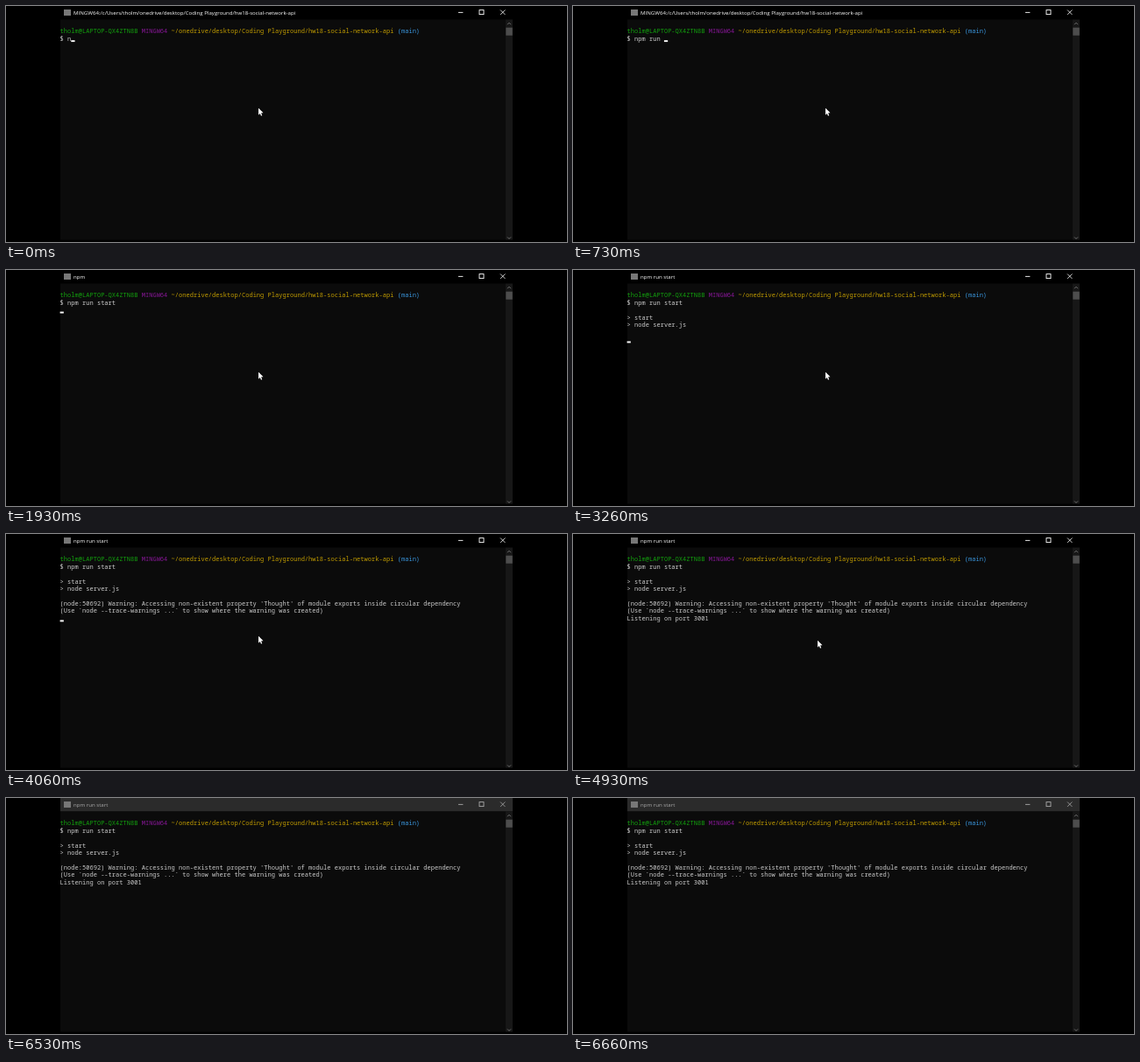
Recreate the animation shown at these times as an HTML page with a canvas. Size 640 by 270 pixels, loop 6730 ms.

```html
<!DOCTYPE html>
<html lang="en">
<head>
<meta charset="utf-8">
<title>Terminal</title>
<style>
html, body { margin: 0; width: 100%; height: 100%; overflow: hidden; background: #000; }
canvas { display: block; width: 640px; height: 270px; }
</style>
</head>
<body>
<canvas id="stage" width="640" height="270"></canvas>
<script>
const ctx = document.getElementById('stage').getContext('2d');
const LOOP = 6730, STEP = LOOP / 101, BLINK = 530;
const LEFT = 61.6, CELL = 4.232, BASE = 31.1, ROW = 8.47;
const MONO = '"Noto Sans Mono", "DejaVu Sans Mono", monospace';
const SANS = '"Open Sans", sans-serif';
const GREY = '#cccccc';

const USER = 'tholm';
const PROJECT = 'onedrive/desktop/Coding Playground/hw18-social-network-api';
const PROMPT = [
  [USER + '@LAPTOP-QX4ZTN8B ', '#13a10e'],
  ['MINGW64 ', '#881798'],
  ['~/' + PROJECT + ' ', '#c19c00'],
  ['(main)', '#3a96dd']
];
const COMMAND = 'npm run start';
const KEYS = [0, 130, 260, 330, 460, 530, 600, 730, 860, 930, 1000, 1130, 1200];
const ENTER = 1430, BLUR = 6400;

const TITLES = [
  [0, 'MINGW64:/c/Users/' + USER + '/' + PROJECT],
  [1660, 'npm'],
  [2530, 'npm run start']
];
// time, first row, lines
const OUTPUT = [
  [3130, 3, ['> start', '> node server.js']],
  [4060, 6, [
    "(node:50692) Warning: Accessing non-existent property 'Thought' of module exports inside circular dependency",
    '(Use `node --trace-warnings ...` to show where the warning was created)'
  ]],
  [4200, 8, ['Listening on port 3001']]
];
// time, column, row of the text cursor after Enter
const CARET = [[ENTER, 0, 2], [3130, 0, 6], [4060, 0, 8], [4200, 0, 9]];
// time, x, y of the pointer tip
const POINTER = [
  [0, 288, 116.7], [4400, 288, 116.7], [4700, 279, 121.7], [4930, 279, 121.7],
  [5400, 338, 260], [5800, 361.3, 225], [5900, 361.3, 225], [6190, 372, 276]
];

const latest = (list, t) => list.filter(item => item[0] <= t).pop();

function rect(x, y, w, h, color) {
  ctx.fillStyle = color;
  ctx.fillRect(x, y, w, h);
}

// Large type scaled down keeps fractional advances.
function text(str, x, y, size, family, color) {
  ctx.save();
  ctx.translate(x, y);
  ctx.scale(0.1, 0.1);
  ctx.font = size * 10 + 'px ' + family;
  ctx.fillStyle = color;
  ctx.fillText(str, 0, 0);
  ctx.restore();
}

function cells(str, col, row, color = GREY) {
  text(str, LEFT + col * CELL, BASE + row * ROW, CELL / 0.6, MONO, color);
}

function line(points, color, width) {
  ctx.beginPath();
  points.forEach(([x, y]) => ctx.lineTo(x, y));
  ctx.strokeStyle = color;
  ctx.lineWidth = width;
  ctx.stroke();
}

function drawWindow(t) {
  const active = t < BLUR;
  const ink = active ? '#ffffff' : '#aaaaaa';
  rect(0, 0, 640, 270, '#000');
  rect(62, 0, 516, 15.5, active ? '#000' : '#2b2b2b');
  rect(62, 15.5, 508, 252, '#0b0b0b');
  rect(570, 15.5, 8, 252, '#171717');
  rect(570.3, 24.7, 7.5, 9, '#4d4d4d');
  rect(66, 4, 8, 7, '#777777');
  text(latest(TITLES, t)[1], 77, 9.6, 6.1, SANS, ink);

  line([[516, 7.4], [521.4, 7.4]], ink, 0.9);
  ctx.strokeRect(540, 4.6, 5, 5);
  line([[564, 4.5], [569.4, 9.9]], ink, 0.8);
  line([[569.4, 4.5], [564, 9.9]], ink, 0.8);
  line([[572, 21.2], [574, 19.2], [576, 21.2]], '#777777', 0.9);
  line([[572, 264.4], [574, 266.4], [576, 264.4]], '#777777', 0.9);
}

function drawTerminal(t) {
  let col = 0;
  for (const [str, color] of PROMPT) {
    cells(str, col, 0, color);
    col += str.length;
  }
  const typed = KEYS.filter(k => k <= t).length;
  cells('$ ' + COMMAND.slice(0, typed), 0, 1);
  for (const [start, row, lines] of OUTPUT) {
    if (t >= start) lines.forEach((str, i) => cells(str, 0, row + i));
  }
  const [since, x, y] = latest(CARET, t) || [KEYS[typed - 1], 2 + typed, 1];
  if (t < BLUR && (t - since) % (2 * BLINK) < BLINK) {
    rect(LEFT + x * CELL, BASE + y * ROW - 0.4, CELL, 1.9, '#ffffff');
  }
}

function drawPointer(t) {
  t = Math.floor((t + 5) / STEP) * STEP;
  const next = POINTER.findIndex(p => p[0] > t);
  if (next < 0) return;
  const [t0, x0, y0] = POINTER[next - 1];
  const [t1, x1, y1] = POINTER[next];
  const k = (t - t0) / (t1 - t0);
  const ease = k * k * (3 - 2 * k);
  ctx.save();
  ctx.translate(x0 + (x1 - x0) * ease, y0 + (y1 - y0) * ease);
  ctx.scale(0.93, 0.93);
  ctx.beginPath();
  [[0, 0], [0, 8.6], [1.9, 6.8], [3.2, 9.8], [4.6, 9.2], [3.3, 6.3], [6, 6.1]]
    .forEach(([x, y]) => ctx.lineTo(x, y));
  ctx.closePath();
  ctx.strokeStyle = '#000';
  ctx.lineWidth = 1;
  ctx.stroke();
  ctx.fillStyle = '#fff';
  ctx.fill();
  ctx.restore();
}

let origin;
function frame() {
  const now = performance.now();
  origin ??= now;
  const t = (now - origin) % LOOP;
  drawWindow(t);
  drawTerminal(t);
  drawPointer(t);
  requestAnimationFrame(frame);
}
frame();
</script>
</body>
</html>
```
